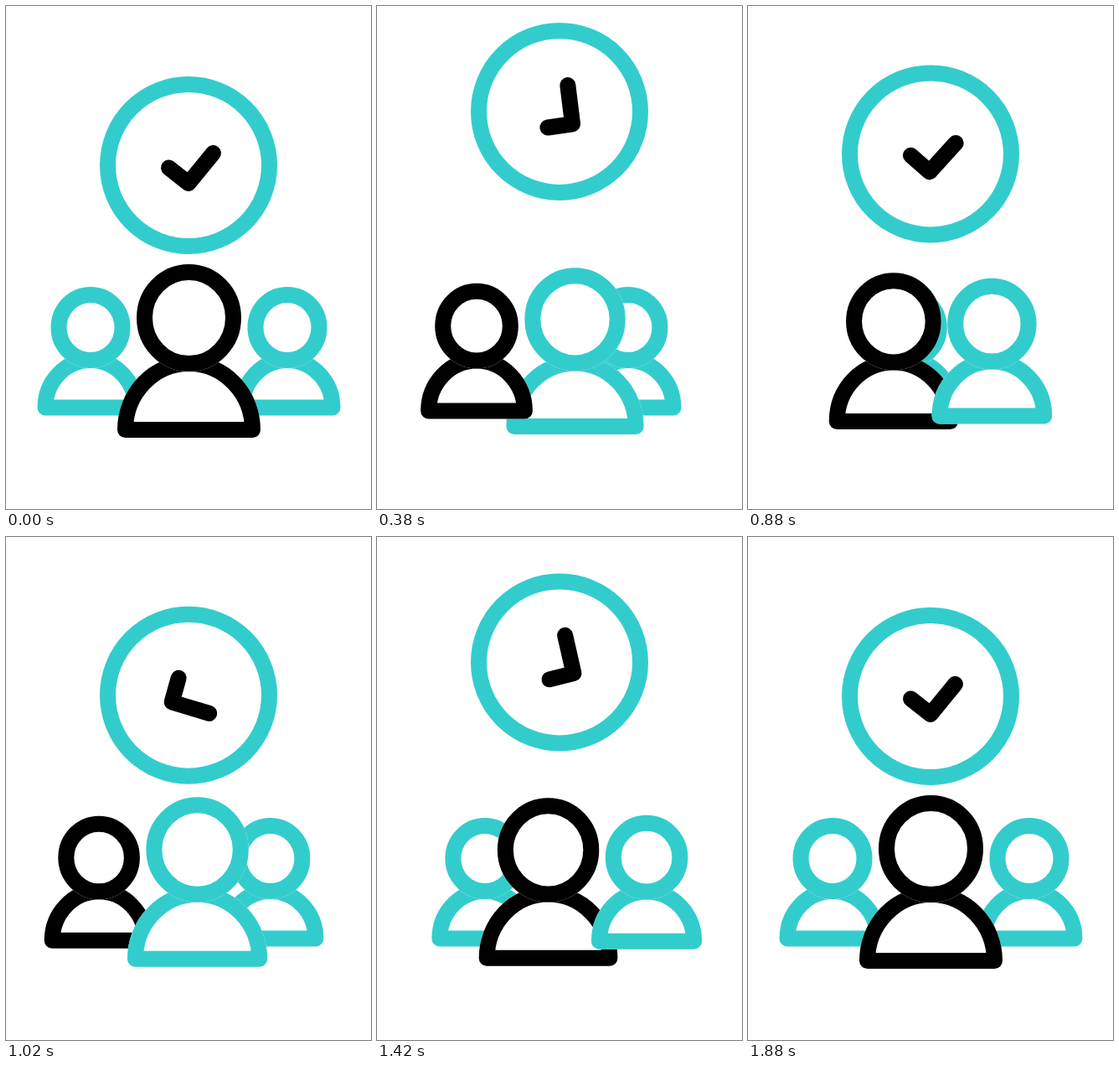
Write an HTML page with a canvas that moves like this. It is 436 px wide and 600 px high and loops after 2.4 s.

```html
<!DOCTYPE html>
<html lang="en">
<head>
<meta charset="utf-8">
<title>Team and clock</title>
<style>
  html, body { margin: 0; width: 100%; height: 100%; overflow: hidden; background: #fff; }
  canvas { display: block; }
</style>
</head>
<body>
<canvas id="stage" width="436" height="600"></canvas>
<script>
const ctx = document.getElementById('stage').getContext('2d');
const LOOP = 2400, TEAL = '#33cccc', BLACK = '#000', LINE = 19;

// Head and body measures of the small side figures and the large front one
const SMALL = { headY: 383.5, rx: 38, ry: 39, half: 54, base: 479, arch: 56.5 };
const LARGE = { headY: 372, rx: 53, ry: 54.5, half: 76, base: 505.5, arch: 79 };
const LEFT = 101, CENTER = 218.5, RIGHT = 336;

// Each turn of the group: swap = when colours and stacking change, start = when it moves
const TURNS = [
  { swap: 0, start: 0, inFront: false },
  { swap: 580, start: 600, inFront: true },
  { swap: 1220, start: 1220, inFront: true },
  { swap: 1840, start: Infinity, inFront: false }
];
const TURN_TIME = 600;

// [time, value, handle of the ease that leads there]
const LIFT = [[0, 0], [500, 77.7, 0.23], [1000, 0, 0.23], [1285, 51, 0.23], [1790, 0, 0.25]];
const SPIN = [[0, 0], [500, -50, 0.6], [1800, 360, 0.57]];

const mix = (a, b, p) => a + (b - a) * p;

// cubic-bezier(h, 0, 1 - h, 1)
function ease(x, h) {
  if (x <= 0) return 0;
  if (x >= 1) return 1;
  let lo = 0, hi = 1;
  for (let i = 0; i < 24; i++) {
    const t = (lo + hi) / 2, u = 1 - t;
    if (3 * h * t * u * u + 3 * (1 - h) * t * t * u + t * t * t < x) lo = t;
    else hi = t;
  }
  return lo * lo * (3 - 2 * lo);
}

function track(keys, t) {
  for (let i = 1; i < keys.length; i++) {
    const [t0, v0] = keys[i - 1], [t1, v1, h] = keys[i];
    if (t < t1) return mix(v0, v1, ease((t - t0) / (t1 - t0), h));
  }
  return keys[keys.length - 1][1];
}

function person(x, size, color) {
  const m = {};
  for (const k in SMALL) m[k] = mix(SMALL[k], LARGE[k], size);
  const body = new Path2D();
  body.moveTo(x - m.half, m.base);
  body.ellipse(x, m.base, m.half, m.arch, 0, Math.PI, 2 * Math.PI);
  body.closePath();
  const head = new Path2D();
  head.ellipse(x, m.headY, m.rx, m.ry, 0, 0, 2 * Math.PI);

  ctx.lineWidth = LINE;
  ctx.fillStyle = '#fff';
  for (const part of [body, head]) {
    ctx.strokeStyle = '#fff';
    ctx.stroke(part);
    ctx.fill(part);
    ctx.strokeStyle = color;
    ctx.stroke(part);
  }
}

function group(t) {
  const turn = TURNS.filter(s => t >= s.swap).pop();
  const p = ease((t - turn.start) / TURN_TIME, 0.75);
  const leaving = () => person(mix(CENTER, LEFT, p), 1 - p, BLACK);
  const coming = () => person(mix(RIGHT, CENTER, p), p, TEAL);
  person(mix(LEFT, RIGHT, p), 0, TEAL);
  if (turn.inFront) { leaving(); coming(); }
  else { coming(); leaving(); }
}

function clock(t) {
  ctx.save();
  ctx.translate(218, 190 - track(LIFT, t));
  ctx.lineWidth = LINE;
  ctx.strokeStyle = TEAL;
  ctx.beginPath();
  ctx.arc(0, 0, 96.5, 0, 2 * Math.PI);
  ctx.stroke();
  ctx.rotate(track(SPIN, t) * Math.PI / 180);
  ctx.strokeStyle = BLACK;
  ctx.beginPath();
  ctx.moveTo(-23.5, 3);
  ctx.lineTo(0, 21.5);
  ctx.lineTo(29.5, -14.5);
  ctx.stroke();
  ctx.restore();
}

function draw(t) {
  ctx.fillStyle = '#fff';
  ctx.fillRect(0, 0, 436, 600);
  ctx.lineCap = ctx.lineJoin = 'round';
  clock(t);
  group(t);
}

const begin = performance.now();
function tick() {
  draw((performance.now() - begin) % LOOP);
  requestAnimationFrame(tick);
}
draw(0);
requestAnimationFrame(tick);
</script>
</body>
</html>
```
